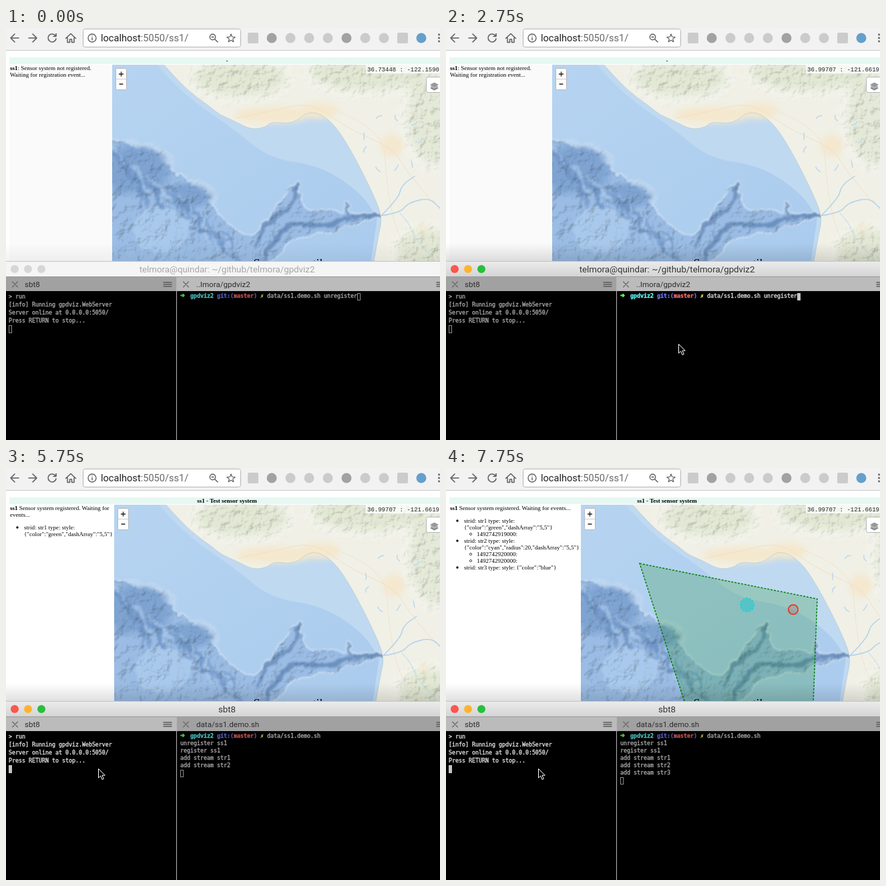
Animation, 650 px wide and 617 px high, one loop 8000 ms. Source, as an HTML page:

```html
<!DOCTYPE html>
<html lang="en">
<head>
<meta charset="utf-8">
<title>Sensor map demo</title>
<style>
  html, body { margin: 0; width: 100%; height: 100%; overflow: hidden; background: #fff; }
  svg { display: block; }
  text { white-space: pre; }
  .page { font: 9px "Liberation Serif", serif; }
  .coords { font: 9px "Liberation Mono", monospace; fill: #222; }
  .ui { font-family: Roboto, sans-serif; }
  .term { font: 8.306px "DejaVu Sans Mono", monospace; fill: #e8e8e8; stroke: #e8e8e8; stroke-width: .3; }
  .line { fill: none; stroke-linecap: round; stroke-linejoin: round; }
</style>
</head>
<body>
<svg id="stage" width="650" height="617" viewBox="0 0 650 617"></svg>
<script>
const DURATION = 8000, BLINK = 500;
const HOME = 'telmora@quindar: ~/github/telmora/gpdviz2';
const SCRIPT = 'data/ss1.demo.sh';

const rect = (x, y, w, h, fill, more = '') =>
  `<rect x="${x}" y="${y}" width="${w}" height="${h}" fill="${fill}" ${more}/>`;
const circle = (x, y, r, fill, more = '') => `<circle cx="${x}" cy="${y}" r="${r}" fill="${fill}" ${more}/>`;
const ellipse = (x, y, rx, ry, fill) => `<ellipse cx="${x}" cy="${y}" rx="${rx}" ry="${ry}" fill="${fill}"/>`;
const text = (x, y, s, more = '') => `<text x="${x}" y="${y}" ${more}>${s}</text>`;
const area = (d, fill) => `<path d="M${d}z" fill="${fill}"/>`;
const line = (d, color, width = 1, more = '') =>
  `<path class="line" d="M${d}" stroke="${color}" stroke-width="${width}" ${more}/>`;
const repeat = (count, make) => Array.from({ length: count }, (_, i) => make(i)).join('');

// Curve through the midpoints of a few key points.
function smooth(points) {
  const p = points.split(' ').map(s => s.split(',').map(Number));
  const curve = p.slice(1, -1).map(([x, y], i) => `Q${x},${y} ${(x + p[i + 2][0]) / 2},${(y + p[i + 2][1]) / 2}`);
  return `${p[0]} ${curve.join(' ')} L${p.at(-1)}`;
}

let seed = 11;
const random = () => (seed = seed * 16807 % 2147483647) / 2147483647;

// Random walk that keeps roughly to one direction.
function wander(x, y, angle, count, stride = 9) {
  let d = `${x},${y}`;
  for (let i = 0; i < count; i++) {
    const a = angle + (random() - .5) * 1.4;
    d += ` l${stride * Math.cos(a)},${stride * Math.sin(a)}`;
  }
  return d;
}

// Hill shading: noise bends and softens the shapes, then lights them as terrain.
const relief = (id, freq, height, blur, wobble) => `
  <filter id="${id}" filterUnits="userSpaceOnUse" x="130" y="30" width="560" height="350" color-interpolation-filters="sRGB">
    <feTurbulence type="fractalNoise" baseFrequency="${freq}" numOctaves="4" seed="7" result="noise"/>
    <feDisplacementMap in="SourceGraphic" in2="noise" scale="${wobble}" xChannelSelector="R" yChannelSelector="G"/>
    <feGaussianBlur stdDeviation="${blur}" result="ground"/>
    <feDiffuseLighting in="noise" surfaceScale="${height}" diffuseConstant="1.24" lighting-color="#fff" result="light">
      <feDistantLight azimuth="225" elevation="54"/>
    </feDiffuseLighting>
    <feBlend in="ground" in2="light" mode="multiply"/>
    <feComposite operator="in" in2="ground"/>
  </filter>`;

const defs = `<defs>
  ${relief('seafloor', .05, 1.6, 1.5, 14)}
  ${relief('hills', .09, 1, 8, 10)}
  <filter id="soft"><feGaussianBlur stdDeviation="5"/></filter>
  <clipPath id="mapClip"><rect x="159" y="55" width="491" height="295"/></clipPath>
  <linearGradient id="water" x2="1" y2="1"><stop stop-color="#b6d4f1"/><stop offset="1" stop-color="#a9caed"/></linearGradient>
  <linearGradient id="shade" x2="0" y2="1"><stop stop-opacity="0"/><stop offset="1" stop-opacity=".12"/></linearGradient>
  <linearGradient id="bar" x2="0" y2="1"><stop stop-color="#ececec"/><stop offset="1" stop-color="#d3d3d3"/></linearGradient>
</defs>`;

const coast = smooth('232,50 262,84 290,107 306,118 320,130 342,139 366,152 388,149 398,140 430,144 455,122 ' +
  '487,138 514,178 544,236 564,282 558,310 549,360');
const shelf = smooth('222,50 262,98 340,150 393,195 470,206 530,245 556,284');
const slope = smooth('110,155 185,172 250,210 292,245 325,288 368,318 405,268 438,222 440,268 500,276 566,279 500,302 420,316 370,390');

function terrain() {
  const gullies = repeat(26, i => {
    const x = 150 + 7 * i, y = 172 + .68 * (x - 150) + 25 * random();
    return line(wander(x, y, 1, 3 + 4 * random()), i % 3 ? '#6c92c3' : '#b0cdee', 2 + 4 * random(), 'opacity=".6"');
  });
  const floor = area(slope + ' 110,390', '#9bbde5') +
    `<g filter="url(#soft)">${ellipse(195, 212, 50, 38, '#7fa4d2')}${ellipse(275, 250, 35, 18, '#7fa4d2')}</g>` + gullies +
    ellipse(232, 303, 42, 34, '#a9c9ec') +
    line(smooth('374,326 387,300 404,279 430,270 437,230'), '#7295c1', 6) +
    line(smooth('388,345 402,316 425,291 480,300 515,280 562,281'), '#6d91be', 6) +
    line('511,262 516,284', '#7c9fca', 4);

  const mountains = ellipse(350, 75, 75, 32, '#e2e8d4') + ellipse(540, 65, 90, 34, '#e2e8d4') +
    ellipse(640, 135, 45, 75, '#e4e9d8') + ellipse(635, 335, 55, 40, '#e2e8d4');
  const towns = ellipse(400, 130, 58, 12, '#f4e8cd') + ellipse(468, 124, 30, 12, '#f4e8cd') +
    circle(578, 176, 17, '#f4e8cf') + circle(624, 300, 7, '#f4e9d2');
  const streams = repeat(9, i =>
    line(wander(575 + 42 * Math.cos(i * .7), 172 + 42 * Math.sin(i * .7), i % 2 ? 1 : -.8, 2, 5), '#b5d3ec', 1.3));

  return rect(159, 55, 491, 295, 'url(#water)') +
    area(shelf + ' 545,360 700,360 700,40', '#bfd9f1') +
    `<g filter="url(#seafloor)">${floor}</g>` +
    area(coast + ' 700,360 700,40', '#f0f0e6') +
    `<g filter="url(#hills)">${mountains}</g><g filter="url(#soft)">${towns}</g>` +
    line(coast, '#b4c5c9', .6) +
    line(smooth('345,135 400,124 458,110 510,150 580,180 600,215 640,262'), '#f3dfc6') +
    line(smooth('490,122 565,150 570,230 580,290 606,350'), '#f2e3d0') +
    line(smooth('562,281 590,277 602,262 634,254 650,270'), '#b0d0ec', 1.4) +
    line(smooth('562,281 588,255 592,236 612,222'), '#b0d0ec', 1.4) +
    line(smooth('590,277 604,292 612,315 640,345'), '#bcd8ee') + streams;
}

function toolbar() {
  const grey = '#5e5e5e';
  const star = repeat(10, i => {
    const r = i % 2 ? 2.8 : 6.5, a = i * Math.PI / 5;
    return ` ${337 + r * Math.sin(a)},${15.5 - r * Math.cos(a)}`;
  });
  const plugin = i => {
    const color = i === 9 ? '#64a0cc' : i % 4 === 1 ? '#a2a2a2' : '#cbcbcb', x = 370 + 28 * i;
    return i % 8 ? circle(x, 15, 7.5, color) : rect(x - 8, 7, 16, 16, color, 'rx="2"');
  };
  return rect(0, 0, 650, 33, '#f2f2f2') + rect(0, 33, 650, 1, '#cbcbcb') +
    line('19,15H7 m6,-6 l-6,6 6,6', grey, 1.6) + line('34,15H46 m-6,-6 l6,6 -6,6', grey, 1.6) +
    line('74,11.5A6,6 0 1 0 75,16 M75,8.5v4h-4', grey, 1.6) +
    line('89.5,15.5 97,8.5 104.5,15.5 M92,14v7.5h3.5v-4.5h3v4.5h3.5v-7.5', grey, 1.5) +
    rect(115.5, 1.5, 236, 27, '#fff', 'rx="3" stroke="#b5b5b5"') +
    circle(129, 15, 6, 'none', `stroke="${grey}" stroke-width="1.3"`) + line('129,14.5v3.5 m0,-6v.1', grey, 1.4) +
    text(142, 20, 'localhost<tspan fill="#666">:5050/ss1/</tspan>', 'class="ui" font-size="14.6" fill="#222"') +
    circle(309.5, 13.5, 4.2, 'none', `stroke="${grey}" stroke-width="1.4"`) + line('313,17l4,4 M308,13.5h3', grey, 1.5) +
    line(star + 'z', grey, 1.2) + repeat(10, plugin) + repeat(3, i => circle(648.5, 10 + 5 * i, 1.4, grey));
}

const mapControls = () =>
  rect(164.5, 60.5, 16, 32, '#fff', 'rx="2" stroke="#b4b8bb"') + line('165,76.5h15', '#ccc') +
  line('169.5,69h6 m-3,-3v6 M170,84h5', '#222', 1.3);

const layersControl = () =>
  rect(629.5, 73.5, 30, 23, '#fff', 'rx="3" stroke="#b4b8bb"') +
  repeat(3, i => area(`635,${90 - 2.5 * i} l6.5,-3.5 6.5,3.5 -6.5,3.5`, ['#888', '#b4b4b4', '#999'][i]));

const NOT_REGISTERED = ['<tspan font-weight="bold">ss1</tspan>: Sensor system not registered.', 'Waiting for registration event...'];
const READY = '<tspan font-weight="bold">ss1</tspan> Sensor system registered. Waiting for';
const item = (n, style = '') => `• strid: str${n} type: style:${style}`;
const stream1 = [item(1), '  {"color":"green","dashArray":"5,5"}'];
const stream2 = [item(2), '  {"color":"red","radius":14}'];
const stream3 = [item(3), '  {"color":"blue"}'];
const event1 = '○ 1492742919000:', event2 = '○ 1492742920000:';

// Each step changes only the listed properties; blink is when the caret cycle began.
const steps = [
  [0, { focus: '', title: HOME, tab: '..lmora/gpdviz2', coords: '36.73448 : -122.1590', heading: '-', status: NOT_REGISTERED,
        list: [], shift: 0, shapes: 0, command: SCRIPT + ' unregister', output: 0, blink: 0, mouse: null }],
  [250, { coords: '36.99707 : -121.6619', mouse: [413, 328], hand: true }],
  [500, { mouse: [389, 494], hand: false }],
  [750, { focus: 'right', blink: 750 }],
  [1500, { mouse: [350, 494] }],
  [1750, { focus: 'left', title: 'sbt8', blink: 1250, mouse: [198, 481] }],
  [2000, { focus: 'right', blink: 1750, mouse: [330, 468] }],
  [2250, { title: HOME, mouse: [348, 473] }],
  [3500, { command: SCRIPT + ' ', blink: 3500 }],
  [4000, { title: SCRIPT, tab: SCRIPT, output: 1 }],
  [4000, { blink: 4000 }],
  [4500, { output: 2, blink: 4500, mouse: [341, 473] }],
  [4750, { focus: 'left', title: 'sbt8', mouse: [208, 463] }],
  [5000, { mouse: [138, 450] }],
  [5250, { heading: 'ss1 - Test sensor system', status: [READY, 'events...'], output: 3 }],
  [5500, { list: stream1, shift: 3 }],
  [5750, { output: 4 }],
  [6000, { list: [...stream1, ...stream2], output: 5 }],
  [6500, { list: [...stream1, ...stream2, ...stream3] }],
  [7000, { list: [...stream1, event1, ...stream2, ...stream3], shapes: 1 }],
  [7500, { status: [READY + ' events...'], shift: 43, shapes: 2,
           list: [...stream1, event1, item(2), '  {"color":"cyan","radius":20,"dashArray":"5,5"}', event2, event2, item(3, ' {"color":"blue"}')] }],
];
let last = {};
const states = steps.map(([at, change]) => last = { ...last, ...change, at });

function sidebar(s) {
  const top = 72 + 10 * s.status.length;
  const row = (entry, i) => {
    const y = top + 10 * i, mark = entry[0], sub = mark === '○';
    const bullet = sub ? circle(37, y - 3, 1.6, 'none', 'stroke="#000" stroke-width=".7"') : mark === '•' ? circle(17, y - 3, 1.7, '#000') : '';
    return bullet + text(sub ? 46 : 27, y, entry.slice(2));
  };
  return rect(5, 55, 154 + s.shift, 294, s.heading === '-' ? '#fafafa' : '#fff') + rect(5, 44, 645, 10, '#e6f8f2') +
    `<g class="page">${text(331, 52, s.heading, 'text-anchor="middle" font-weight="bold"')}
    ${s.status.map((t, i) => text(6, 63 + 10 * i, t)).join('')}${s.list.map(row).join('')}</g>`;
}

function overlays(s) {
  const dash = 'stroke-dasharray="3 2"';
  return (s.shapes > 0 ? `<path d="M247,143 513,196 506,380 324,380z" fill="green" fill-opacity=".2" stroke="green" stroke-width="1.5" ${dash}/>` : '') +
    (s.shapes > 1 ? circle(408, 205, 10, '#0cc', `fill-opacity=".4" stroke="#1fd0e0" stroke-width="1.8" ${dash}`) +
      circle(477, 212, 7.2, '#c33', 'fill-opacity=".2" stroke="#e8352b" stroke-width="1.8"') : '');
}

function caretAt(x, y, h, focused, on) {
  if (!focused) return rect(x + .5, y + .5, 4, h - 1, 'none', 'stroke="#8c8c8c"');
  return on ? rect(x, y, 5, h, '#c4c4c4') : '';
}

function tabBar(x, width, label, focused) {
  const menu = x ? 645 : 236;
  return rect(x, 373, width, 21, focused ? '#bbb' : '#a1a1a1') +
    line(`${x + 9.5},380 l8,8 m0,-8 l-8,8`, '#666', 1.1) +
    text(x ? 285 : 28, 388, label, 'class="ui" font-size="11.6" fill="#2c2c2c"') +
    line(`${menu},381h12 m-12,3h12 m-12,3h12`, '#5c5c5c', 1.3);
}

function terminal(s, caretOn) {
  const active = s.focus !== '', left = s.focus === 'left', right = s.focus === 'right';
  const lights = active ? ['#fb5650', '#fdb42e', '#26c03c'] : Array(3).fill('#d6d6d6');
  const server = ['> run', '[info] Running gpdviz.WebServer', 'Server online at 0.0.0.0:5050/', 'Press RETURN to stop...'];
  const output = ['unregister ss1', 'register ss1', 'add stream str1', 'add stream str2', 'add stream str3'].slice(0, s.output);
  const word = (col, t, color, more = 'font-weight="bold"') =>
    text(261 + 5 * col, 404, t, `fill="${color}" stroke="${color}" ${more}`);
  const prompt = word(0, '➜', '#5ff967', 'font-size="11" stroke-width="1"') + word(3, 'gpdviz2', '#5ffdff') + word(11, 'git:(', '#6f78ff') +
    word(16, 'master', '#ff6d67') + word(22, ')', '#6f78ff') + word(24, '✗', '#fefb67') + word(26, s.command.trim(), '#e8e8e8', '');
  const caretX = s.output ? 261 : 391 + 5 * s.command.length;
  return rect(0, 322, 650, 27, 'url(#shade)', `opacity="${active ? 1 : .4}"`) +
    rect(0, 349, 650, 268, '#000') + rect(0, 349, 650, 24, active ? 'url(#bar)' : '#f5f5f5') +
    rect(0, 349, 650, 1, '#c4c4c4') + rect(0, 372, 650, 1, '#9a9a9a') +
    lights.map((c, i) => circle(13 + 20 * i, 361, 6, c)).join('') +
    text(331, 366, s.title, `class="ui" font-size="13.3" text-anchor="middle" fill="${active ? '#333' : '#a6a6a6'}"`) +
    tabBar(0, 255, 'sbt8', left) + tabBar(256, 394, s.tab, right || !active) + rect(255, 373, 1, 244, '#b8b8b8') +
    `<g class="term" opacity="${left ? 1 : .75}">${server.map((t, i) => text(4, 405 + 12.1 * i, t)).join('')}</g>` +
    caretAt(4, 445, 12, left, caretOn) +
    `<g class="term" opacity="${right ? 1 : .75}">${prompt}${output.map((t, i) => text(261, 415 + 11 * i, t)).join('')}</g>` +
    caretAt(caretX, 397 + (s.output ? 11 * (s.output + 1) : 0), 11, right, caretOn);
}

function pointer(s) {
  if (!s.mouse) return '';
  const shape = s.hand
    ? '<path d="M5,21 1,13Q0,10 5,13L3.5,5Q5,2 7,9V2.5Q8.5,0 10,9L11.5,3.5Q14,2 13,10L15,7Q17,7 13.5,21z" fill="#fff" stroke="#000"/>'
    : '<path d="M.5,.5V14L3.7,11 6,16.5 8.3,15.5 6,10.2H10.3z" fill="#000" stroke="#fff"/>';
  return `<g transform="translate(${s.mouse})">${shape}</g>`;
}

const stage = document.getElementById('stage');
stage.innerHTML = `${defs}${rect(0, 0, 650, 617, '#fff')}${toolbar()}<g id="sidebar"></g>
  <g id="map"><g clip-path="url(#mapClip)">${terrain()}</g><g id="overlays"></g>${mapControls()}</g>
  ${layersControl()}${rect(539, 55, 111, 13, '#fff', 'fill-opacity=".75"')}<g id="coords"></g>
  ${text(430, 359, 'Sensor map tiles', 'text-anchor="middle" font-size="18" font-family="Liberation Serif, serif"')}
  <g id="terminal"></g><g id="pointer"></g>`;

const part = id => document.getElementById(id);
function draw(s, caretOn) {
  part('map').setAttribute('transform', `translate(${s.shift})`);
  part('sidebar').innerHTML = sidebar(s);
  part('overlays').innerHTML = overlays(s);
  part('coords').innerHTML = text(541, 64.5, s.coords, 'class="coords"');
  part('terminal').innerHTML = terminal(s, caretOn);
  part('pointer').innerHTML = pointer(s);
}

let shown, shownCaret;
function tick() {
  const time = performance.now() % DURATION;
  const state = states.findLast(s => s.at <= time);
  const caretOn = Math.floor((time - state.blink) / BLINK) % 2 === 0;
  if (state !== shown || caretOn !== shownCaret) draw(shown = state, shownCaret = caretOn);
  requestAnimationFrame(tick);
}
tick();
</script>
</body>
</html>
```
